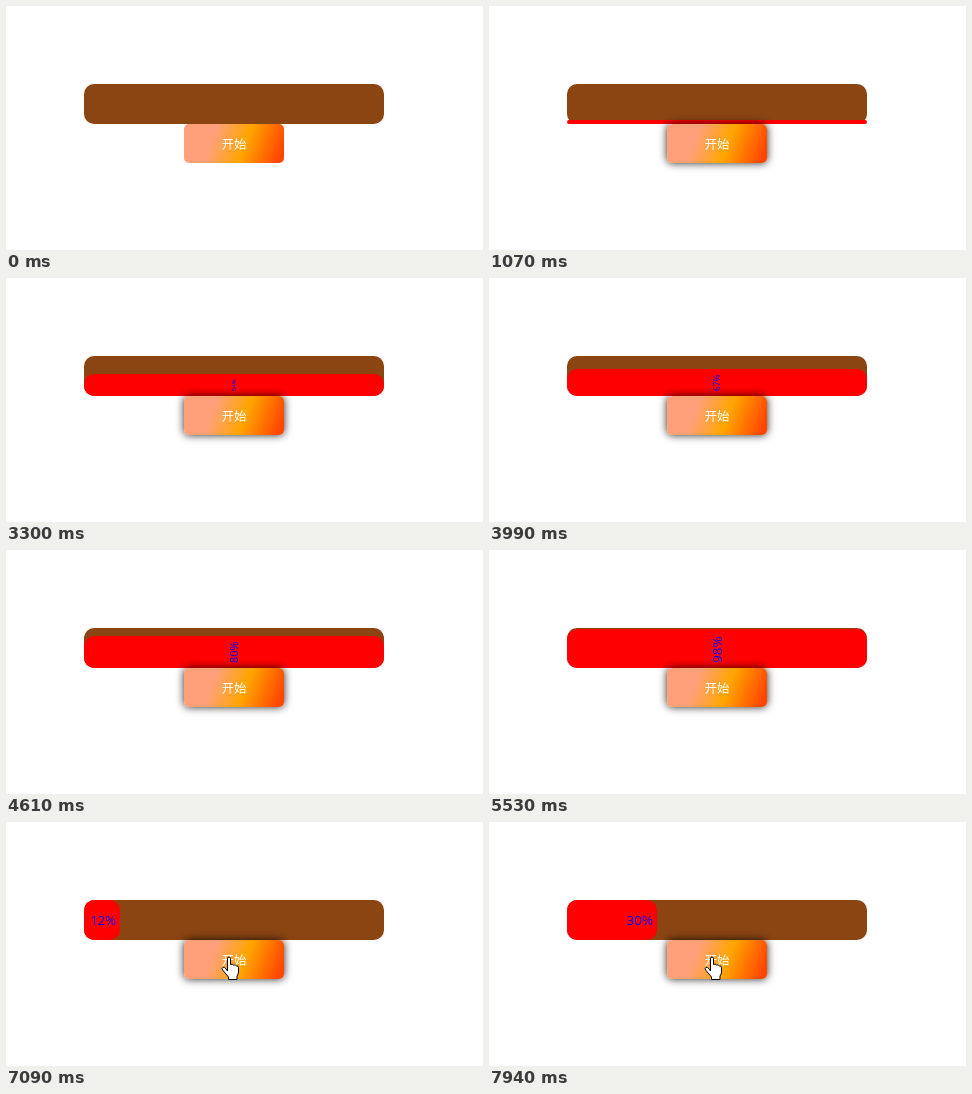
An HTML page that plays this animation: 477 by 244 pixels, repeating every 8000 ms.

```html
<!DOCTYPE html>
<html lang="zh">
<head>
<meta charset="utf-8">
<style>
html, body { margin: 0; width: 100%; height: 100%; overflow: hidden; background: #fff; }
div, span, svg { position: absolute; }
#bar { left: 78px; top: 78px; width: 300px; height: 40px; border-radius: 10px; background: #8b4513; }
#fill { left: 0; bottom: 0; border-radius: 10px; background: red; }
#label { left: 0; top: 0; transform-origin: 0 0; color: blue; white-space: nowrap;
  font: 13.5px/18px "Open Sans", "Noto Sans", sans-serif; }
#button { left: 178px; top: 118px; width: 100px; height: 39px; border-radius: 5px;
  background: linear-gradient(110deg, #ffa07a 30%, orange 60%, #ff4500 95%);
  color: #fff; text-align: center; font: 12.5px/39px "Noto Sans CJK SC", "Noto Sans CJK", sans-serif; }
#button.focus { box-shadow: 0 0 8px rgba(0, 0, 0, .85); }
#cursor { left: 0; top: 0; width: 20px; height: 26px; fill: #fff; stroke: #000; }
</style>
</head>
<body>
<div id="bar"><div id="fill"></div><span id="label"></span></div>
<div id="button">开始</div>
<svg id="cursor"><path id="shape"/></svg>
<script>
const LOOP = 8000, TURN = 5850;
const HAND = "M6.5 15V2.5a1.5 1.5 0 0 1 3 0V8.5q2-1 3 .6 2-.8 2.8.8 2.2-.4 2.2 1.8V16q0 2-1.5 4v3.5H7.5V21L2 14.5q-1.8-2.5 0-3.2 1.5-.5 3 1.5z";
const ARROW = "M.5 1V17.500l4-3.700 2.500 6 2.500-1-2.500-5.800h5.500z";
// Pointer visits: [time, x, y] points, hidden between visits
const visits = [
  [[70, 240, 222], [300, 228, 138], [680, 228, 138], [840, 270, 180], [920, 270, 180]],
  [[6020, 81, 130], [6089, 81, 130], [6090, 230, 131], [6480, 230, 131],
   [6750, 218, 137], [7090, 215, 134], [LOOP, 215, 134]]
];
const $ = id => document.getElementById(id);
const fill = $("fill"), label = $("label"), cursor = $("cursor");

function pointerAt(t) {
  for (const path of visits)
    for (let i = 1; i < path.length; i++) {
      const [t0, x0, y0] = path[i - 1], [t1, x1, y1] = path[i];
      if (t >= t0 && t < t1) {
        const k = (t - t0) / (t1 - t0);
        return [x0 + (x1 - x0) * k, y0 + (y1 - y0) * k];
      }
    }
}

function percentAt(t) {
  if (t >= TURN && t < 6520) return 100;
  const steps = t < TURN ? (t - 600) / 50 : (t - 6520) / 47.3;
  return Math.max(0, Math.min(100, Math.floor(steps + 0.01)));
}

function drawBar(t) {
  const upright = t < TURN, p = percentAt(t), size = p * (upright ? 0.4 : 3);
  fill.style.width = upright ? "300px" : size + "px";
  fill.style.height = upright ? size + "px" : "40px";
  label.textContent = p + "%";
  // The label shrinks to fit inside the fill's padding
  const scale = Math.max(0, Math.min(1, (size - 10) / label.offsetWidth));
  label.style.visibility = scale > 0.2 ? "visible" : "hidden";
  label.style.transform = upright
    ? `translate(150px, 35px) rotate(-90deg) scale(${scale}) translate(0, -50%)`
    : `translate(${size - 4}px, 20px) scale(${scale}) translate(-100%, -50%)`;
}

function drawPointer(t) {
  const at = pointerAt(t);
  cursor.style.display = at ? "block" : "none";
  if (!at) return;
  const [x, y] = at.map(Math.round);
  cursor.style.transform = `translate(${x}px, ${y}px)`;
  $("shape").setAttribute("d", x > 170 && y < 158 ? HAND : ARROW);
}

function draw(now) {
  const t = now % LOOP;
  drawBar(t);
  drawPointer(t);
  $("button").classList.toggle("focus", t >= 250);
}

const start = performance.now();
function frame() {
  draw(performance.now() - start);
  requestAnimationFrame(frame);
}
frame();
</script>
</body>
</html>
```
